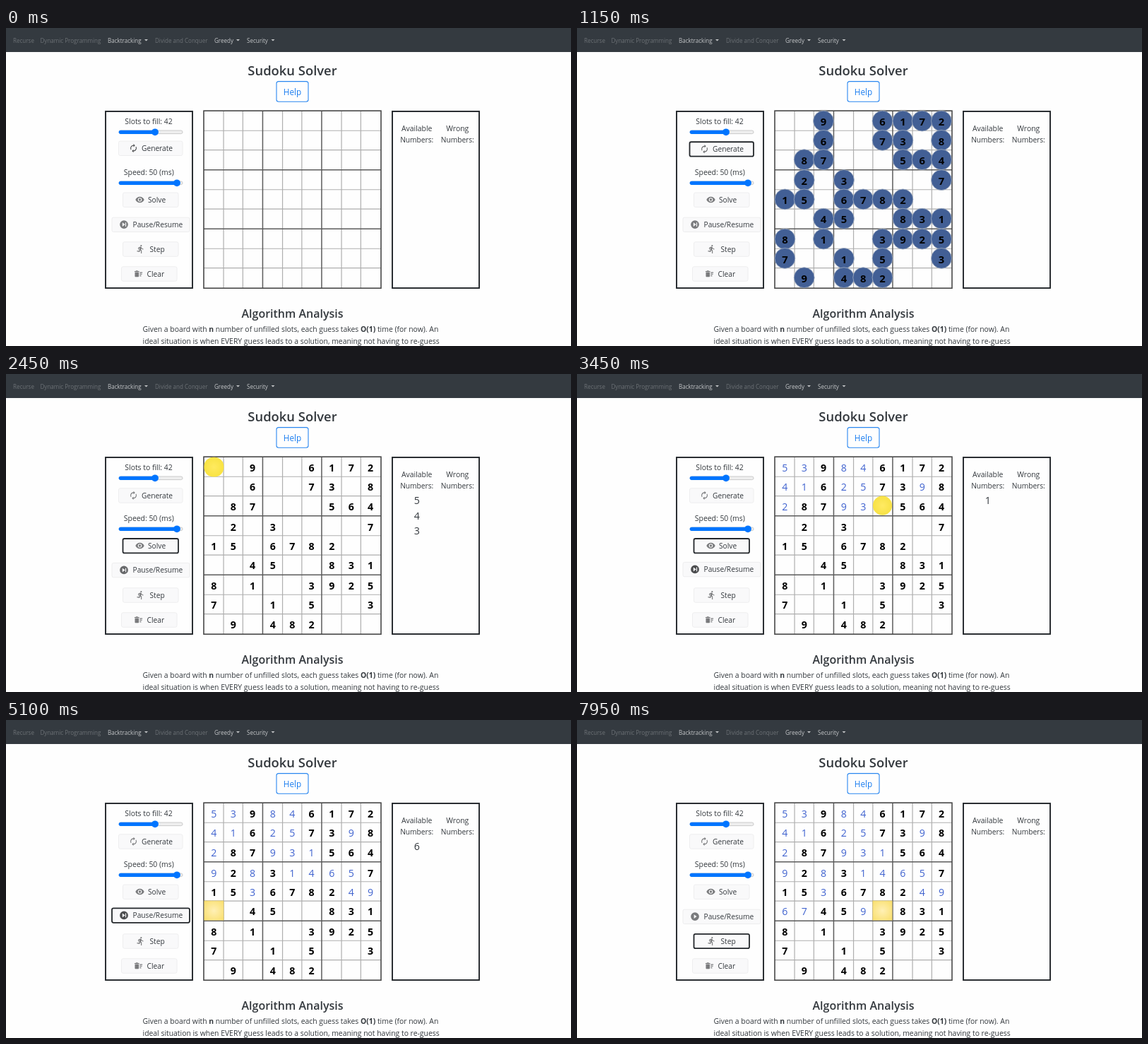
Recreate the animation shown at these times as an HTML page. Size 800 px wide and 450 px high, loop 8000 ms.

```html
<!DOCTYPE html>
<html lang="en">
<head>
<meta charset="utf-8">
<title>Sudoku Solver</title>
<style>
  html, body { margin: 0; width: 100%; height: 100%; overflow: hidden; background: #fefefe; }
  svg { display: block; font-family: 'Open Sans', 'Noto Sans', sans-serif; font-size: 10.4px; fill: #33383d; }
  .mid { text-anchor: middle; }
  .nav { font-size: 8.05px; fill: #6c7175; }
  .nav.on { fill: #c3c5c7; }
  .digit { text-anchor: middle; font-size: 14.2px; }
  .given { font-weight: 700; fill: #000; }
  .found { fill: #3f62cf; }
  .panel { fill: none; stroke: #212529; stroke-width: 1.9; }
</style>
</head>
<body>
<svg id="stage" width="800" height="450" viewBox="0 0 800 450"></svg>
<script>
const LOOP = 8000, FRAME = 50;
const GIVENS = ['009006172', '006007308', '087000564', '020300007', '150678200',
  '004500831', '801003925', '700105003', '090482000'];

// One visit per entry: row and column, available numbers, "/" wrong numbers.
const VISITS = ('00:543 01:34 03:8 04:4 10:42 11:1 13:92 14:25 17: 14:5/2 17: 14:/25 13:2/9 14:59 17:9 ' +
  '20:2 23:9 24:13 25: 24:3/1 25:1 30:96 32:8 34:1 35:4 36:46 37:5 42:3 47: 42:/3 37:/5 36:6/4 ' +
  '37:5 42:3 47:4 48:9 50:6 51:7 54:92 55:').split(' ').map(entry => {
    const [cell, lists] = entry.split(':');
    const [open, wrong = ''] = lists.split('/');
    return { cell, open, wrong };
  });
const SOLVE_AT = 2400, PACE = 52, PAUSED = 36;
const MANUAL_STEPS = [5950, 6500, 7150];
const GENERATE_AT = 100;

// time, scale, corner (share of the side), red, green, blue
const BLUE = [
  [0, .3, .5, 14, 24, 78], [450, .9, .5, 30, 58, 120], [750, 1.2, .5, 52, 82, 140],
  [1050, 1.04, .5, 66, 95, 149], [1250, 1.08, .25, 118, 150, 203], [1450, 1, 0, 175, 199, 233]];
// time, scale, corner, edge colour, centre colour
const YELLOW = [
  [0, .97, .5, 243, 222, 58, 255, 234, 100], [120, 1.05, .42, 250, 226, 50, 255, 234, 90],
  [350, 1.2, .03, 253, 227, 36, 254, 233, 66], [750, 1, .01, 249, 222, 104, 255, 240, 180],
  [1500, 1, 0, 250, 226, 122, 255, 243, 196]];

const ICONS = {
  cycle: 'M12 6v3l4-4-4-4v3c-4.4 0-8 3.6-8 8 0 1.6.5 3 1.2 4.3L6.7 14.8c-.4-.8-.7-1.8-.7-2.8 0-3.3 2.7-6 6-6z' +
    'm6.8 1.7L17.3 9.2c.4.8.7 1.8.7 2.8 0 3.3-2.7 6-6 6v-3l-4 4 4 4v-3c4.4 0 8-3.6 8-8 0-1.6-.5-3-1.2-4.3z',
  eye: 'M12 4.5C7 4.5 2.7 7.6 1 12c1.7 4.4 6 7.5 11 7.5s9.3-3.1 11-7.5c-1.7-4.4-6-7.5-11-7.5z' +
    'M12 7a5 5 0 100 10 5 5 0 000-10zM12 9a3 3 0 110 6 3 3 0 010-6z',
  pause: 'M12 1.5a10.5 10.5 0 100 21 10.5 10.5 0 000-21zM8 7l7 5-7 5zM15.5 7h2v10h-2z',
  play: 'M12 1.5a10.5 10.5 0 100 21 10.5 10.5 0 000-21zM9.5 7l7 5-7 5z',
  run: 'M13.5 1.5a2 2 0 110 4 2 2 0 010-4zM9.9 19.4l1-4.4 2.1 2v6h2v-7.5l-2.1-2 .6-3c1.3 1.5 3.3 2.5 5.5 2.5v-2' +
    'c-1.9 0-3.5-1-4.3-2.4l-1-1.6c-.4-.6-1-1-1.7-1-.3 0-.5.1-.8.1L6 8.3V13h2V9.6l1.8-.7-1.6 8.1-4.9-1-.4 2z',
  sweep: 'M15 16h4v2h-4zM15 8h7v2h-7zM15 12h6v2h-6zM3 18c0 1.1.9 2 2 2h6c1.1 0 2-.9 2-2V8H3zM14 5h-3l-1-1H6L5 5H2v2h12z'
};
const BUTTONS = [
  { label: 'Generate', icon: 'cycle', x: 159.5, w: 90.5, y: 172, ix: 180.5, tx: 192, hover: [-999, 1050], focus: [100, 2300] },
  { label: 'Solve', icon: 'eye', x: 165.5, w: 78.5, y: 243.2, ix: 189.5, tx: 201, hover: [1400, 2300], focus: [2300, 4300] },
  { label: 'Pause/Resume', icon: 'pause', x: 150, w: 110, y: 278.3, ix: 167, tx: 179.5, hover: [2390, 5250], focus: [4300, 5950] },
  { label: 'Step', icon: 'run', x: 165.5, w: 78.5, y: 313, ix: 190.5, tx: 203.5, hover: [5550, 7650], focus: [5950, 9000] },
  { label: 'Clear', icon: 'sweep', x: 163.5, w: 78.5, y: 348, ix: 187.5, tx: 199.5, hover: [9e9, 9e9], focus: [9e9, 9e9] }
];

const SIDE = 27.8;
const offset = i => 27.3 * i + 1.6 * Math.floor(i / 3);
const cx = col => 294.4 + offset(col);
const cy = row => 131.6 + offset(row);
const text = (x, y, body, attrs = '') => `<text x="${x}" y="${y}" ${attrs}>${body}</text>`;
const line = (x1, y1, x2, y2, color, width) =>
  `<path d="M${x1} ${y1}L${x2} ${y2}" stroke="${color}" stroke-width="${width}"/>`;

function navBar() {
  const items = [[10, 'Recurse'], [48.5, 'Dynamic Programming'], [144, 'Backtracking', 196],
    [211, 'Divide and Conquer'], [295, 'Greedy', 326], [341, 'Security', 375.5]];
  return '<rect width="800" height="34" fill="#343a40"/>' + items.map(([x, label, caret]) =>
    text(x, 20.8, label, `class="nav ${caret ? 'on' : ''}"`) +
    (caret ? `<path d="M${caret} 16h5l-2.5 2.6z" fill="#c3c5c7"/>` : '')).join('');
}

function slider(y, thumb) {
  return `<rect x="160" y="${y - 2.3}" width="90" height="4.6" rx="2.3" fill="#efefef" stroke="#b8b8b8" stroke-width=".7"/>
    <rect x="159.7" y="${y - 2.6}" width="${thumb - 159.7}" height="5.2" rx="2.6" fill="#0075ff"/>
    <circle cx="${thumb}" cy="${y}" r="4.9" fill="#0075ff"/>`;
}

function gridLines() {
  let thin = '', thick = '';
  for (let i = 1; i < 9; i++) {
    const at = (offset(i) + offset(i - 1)) / 2;
    const bold = i % 3 === 0, color = bold ? '#5c5c5c' : '#aeaeae', width = bold ? 1.5 : 1.2;
    const pair = line(294.4 + at, 117, 294.4 + at, 368, color, width) + line(280, 131.6 + at, 531, 131.6 + at, color, width);
    if (bold) thick += pair; else thin += pair;
  }
  return thin + thick + '<rect x="280" y="117.2" width="251" height="251" fill="none" stroke="#484848" stroke-width="1.6"/>';
}

function cells() {
  let out = '';
  GIVENS.forEach((row, r) => [...row].forEach((n, c) => {
    const given = n !== '0';
    out += `<g class="cell" id="c${r}${c}" data-given="${given ? 1 : ''}">` +
      (given ? `<rect x="${-SIDE / 2}" y="${-SIDE / 2}" width="${SIDE}" height="${SIDE}" stroke="#a3afc2" stroke-width=".8"/>` : '') +
      text(0, 6.5, given ? n : '', `class="digit ${given ? 'given' : 'found'}"`) + '</g>';
  }));
  return out;
}

const buttonMarkup = b => `<g class="button">
  <rect x="${b.x}" y="${b.y - 10.2}" width="${b.w}" height="20.4" rx="2.2" fill="#f9f9fa"/>
  <path d="${ICONS[b.icon]}" fill-rule="evenodd" transform="translate(${b.ix - 6.7} ${b.y - 6.9}) scale(.56)"/>
  ${text(b.tx, b.y + 3.8, b.label, 'font-size="10.2"')}</g>`;

const column = (x, first, id) => text(x, 146.3, first, 'class="mid"') + text(x, 162.3, 'Numbers:', 'class="mid" font-size="10.2"') +
  [0, 1, 2].map(i => text(x, 183.9 + 21.6 * i, '', `class="digit ${id}"`)).join('');

const stage = document.getElementById('stage');
stage.innerHTML = `
  <defs><radialGradient id="glow" r=".7"><stop offset="0"/><stop offset="1"/></radialGradient></defs>
  ${navBar()}
  ${text(405.5, 66.6, 'Sudoku Solver', 'class="mid" font-size="18.4" font-weight="600"')}
  <rect x="383" y="75.6" width="45" height="28.6" rx="3" fill="none" stroke="#2a87f0" stroke-width="1.1"/>
  ${text(405.5, 94.6, 'Help', 'class="mid" style="font-size:11.7px;fill:#1a7df0"')}
  <rect class="panel" x="141" y="118" width="123" height="250"/>
  <rect class="panel" x="547" y="118" width="123" height="250"/>
  ${text(202, 135.9, 'Slots to fill: 42', 'class="mid"')}${slider(147.3, 211)}
  ${text(202.3, 207.9, 'Speed: 50 (ms)', 'class="mid"')}${slider(219.3, 242)}
  ${BUTTONS.map(buttonMarkup).join('')}
  ${column(581.7, 'Available', 'open')}${column(639.3, 'Wrong', 'wrong')}
  ${gridLines()}${cells()}
  <rect id="cursor" fill="url(#glow)" stroke="#b5a468" stroke-width=".8"/>
  ${text(405.5, 409.8, 'Algorithm Analysis', 'class="mid" font-size="16" font-weight="600"')}
  ${text(193.5, 430.3, 'Given a board with <tspan font-weight="700">n</tspan> number of unfilled slots, each guess takes <tspan font-weight="700">O(1)</tspan> time (for now). An')}
  ${text(193.5, 446.6, 'ideal situation is when EVERY guess leads to a solution, meaning not having to re-guess')}`;

const all = selector => [...stage.querySelectorAll(selector)];
const cellNodes = all('.cell'), buttonNodes = all('.button'), stops = all('stop');
const openNodes = all('.open'), wrongNodes = all('.wrong');
const cursor = stage.querySelector('#cursor');

function sample(keys, t) {
  const next = keys.findIndex(k => k[0] > t);
  if (next < 0) return keys[keys.length - 1].slice(1);
  if (next === 0) return keys[0].slice(1);
  const a = keys[next - 1], b = keys[next], p = (t - a[0]) / (b[0] - a[0]);
  return a.slice(1).map((v, i) => v + (b[i + 1] - v) * p);
}
const rgb = parts => `rgb(${parts.map(Math.round).join(',')})`;
const within = (t, [from, to]) => t >= from && t < to;
const clamp = v => Math.max(0, Math.min(1, v));

function visitAt(t) {
  if (t < SOLVE_AT) return { index: -1, since: 0 };
  const manual = MANUAL_STEPS.filter(s => s <= t);
  if (manual.length) return { index: PAUSED + manual.length, since: t - manual[manual.length - 1] };
  const index = Math.min(PAUSED, Math.floor((t - SOLVE_AT) / PACE));
  return { index, since: t - SOLVE_AT - index * PACE };
}

function drawButtons(t) {
  BUTTONS.forEach((b, i) => {
    const raise = clamp((t - b.hover[0]) / 150) * (1 - clamp((t - b.hover[1]) / 150));
    const [box, icon] = buttonNodes[i].children;
    const focused = within(t, b.focus);
    buttonNodes[i].setAttribute('transform', `translate(0 ${-1.7 * raise})`);
    box.setAttribute('stroke', focused ? '#23272b' : '#ececee');
    box.setAttribute('stroke-width', focused ? 1.8 : .9);
    const tone = 122 - 46 * raise;
    icon.setAttribute('fill', rgb([tone, tone + 1, tone + 3]));
    if (b.icon === 'pause') icon.setAttribute('d', t < 5600 ? ICONS.pause : ICONS.play);
  });
}

function drawBoard(t, index) {
  const found = {};
  VISITS.slice(0, Math.max(0, index)).forEach(v => found[v.cell] = v.open[0] || '');
  const here = index < 0 ? '' : VISITS[index].cell;
  const [scale, corner, ...color] = sample(BLUE, t - GENERATE_AT);
  const filled = t >= GENERATE_AT && t < SOLVE_AT;
  cellNodes.forEach((node, i) => {
    const r = Math.floor(i / 9), c = i % 9, key = `${r}${c}`;
    const grow = node.dataset.given && filled ? scale : 1;
    node.setAttribute('transform', `translate(${cx(c)} ${cy(r)}) scale(${grow})`);
    if (!node.dataset.given) {
      node.firstChild.textContent = key < here ? found[key] || '' : '';
      return;
    }
    node.style.display = t < GENERATE_AT ? 'none' : '';
    const box = node.firstChild;
    box.style.display = filled ? '' : 'none';
    box.setAttribute('rx', SIDE * corner);
    box.setAttribute('fill', rgb(color));
  });
}

function drawCursor({ index, since }) {
  const visit = VISITS[index];
  cursor.style.display = visit ? '' : 'none';
  openNodes.forEach((n, i) => n.textContent = visit && visit.open[i] || '');
  wrongNodes.forEach((n, i) => n.textContent = visit && visit.wrong[i] || '');
  if (!visit) return;
  const [scale, corner, ...colors] = sample(YELLOW, since);
  const side = SIDE * scale, [r, c] = visit.cell;
  const box = { x: cx(+c) - side / 2, y: cy(+r) - side / 2, width: side, height: side, rx: side * corner,
    'stroke-opacity': corner > .3 ? 0 : 1, 'stroke-dasharray': '1.2 1' };
  for (const name in box) cursor.setAttribute(name, box[name]);
  stops[0].setAttribute('stop-color', rgb(colors.slice(3)));
  stops[1].setAttribute('stop-color', rgb(colors.slice(0, 3)));
}

function draw(t) {
  const visit = visitAt(t);
  drawButtons(t);
  drawBoard(t, visit.index);
  drawCursor(visit);
}

let start;
function tick(now) {
  start ??= now;
  draw(Math.floor((now - start) % LOOP / FRAME) * FRAME);
  requestAnimationFrame(tick);
}
draw(0);
requestAnimationFrame(tick);
</script>
</body>
</html>
```
